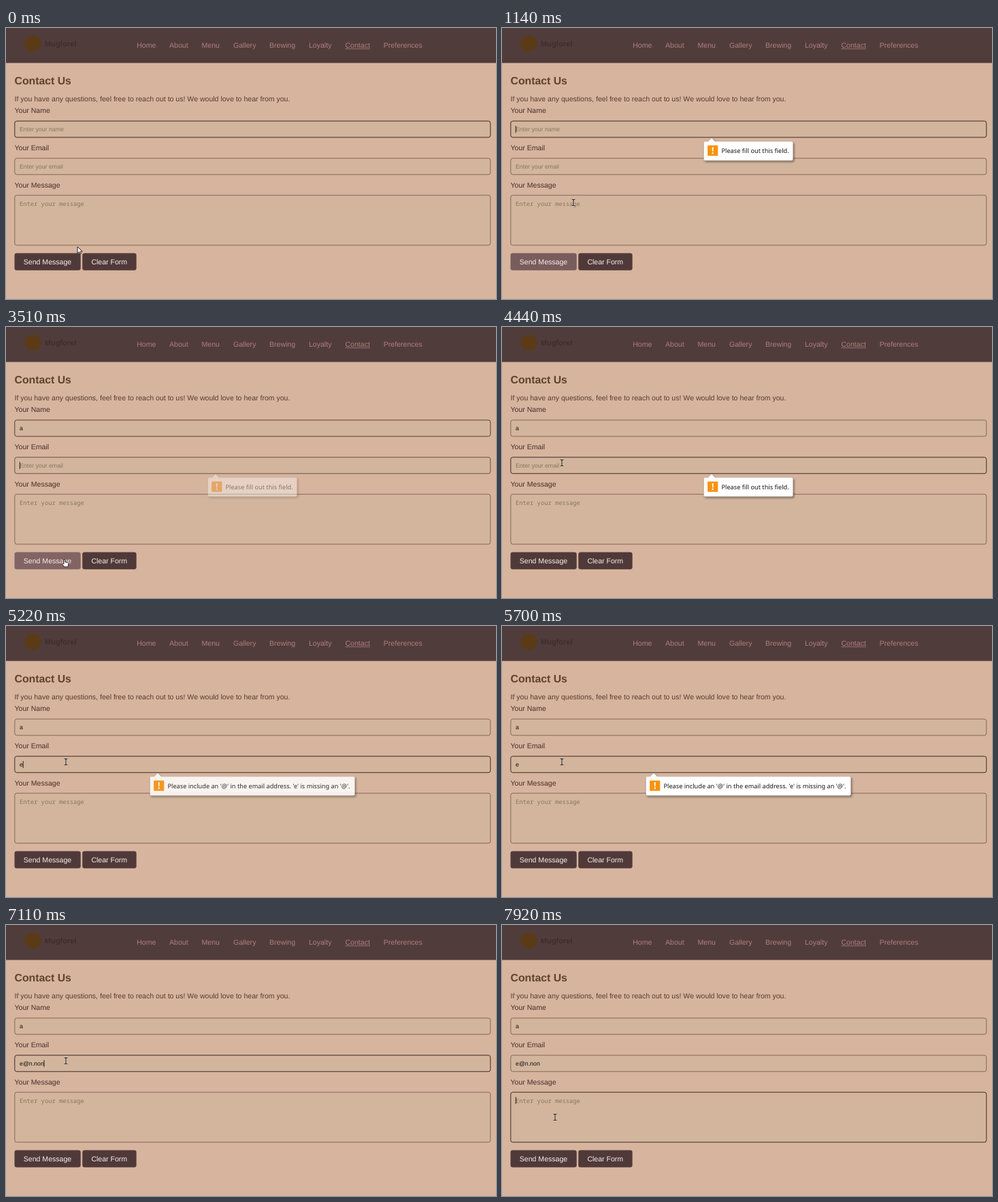
An HTML page for the animation above (8 s loop, 720 by 399 pixels).

```html
<!DOCTYPE html>
<html lang="en">
<head>
<meta charset="utf-8">
<title>Contact form</title>
<style>
html, body { margin: 0; width: 100%; height: 100%; overflow: hidden; background: #d7b49e; }
svg { display: block; width: 100vw; height: 100vh; text-rendering: geometricPrecision; }
text { font: 10.55px "Liberation Sans", Arial, sans-serif; fill: #46302b; white-space: pre; }
.nav { fill: #ae807c; }
.brand { font-size: 11px; font-weight: bold; fill: #402d2c; }
.title { font-size: 15.8px; font-weight: bold; fill: #5f422a; }
.intro { fill: #573c30; }
.value { font-size: 8.79px; fill: #15100e; }
.hint { font-size: 8.79px; fill: #8b7463; }
.mono { font-family: "Noto Sans Mono", "DejaVu Sans Mono", monospace; }
.button { fill: #f6eeec; }
.tip { font: 9.2px "Noto Sans", "Open Sans", sans-serif; fill: #161616; }
</style>
</head>
<body>
<svg id="stage" viewBox="0 0 720 399" preserveAspectRatio="none">
  <defs>
    <filter id="shadow" x="-10%" y="-30%" width="120%" height="180%">
      <feDropShadow dx="1.5" dy="2" stdDeviation="1.4" flood-color="#000" flood-opacity=".45"/>
    </filter>
  </defs>
  <rect width="720" height="399" fill="#d7b49e"/>
  <rect width="720" height="51.5" fill="#513c3c"/>
  <circle cx="39.3" cy="23" r="12" fill="#5b3b15"/>
  <text class="brand" x="57" y="27.3">Mugforel</text>
  <g id="nav"></g>
  <path d="M498.5 30.7H535" stroke="#ae807c" stroke-width=".8"/>
  <text class="title" x="12.5" y="82.6">Contact Us</text>
  <text class="intro" x="12.5" y="108.4">If you have any questions, feel free to reach out to us! We would love to hear from you.</text>
  <g id="form"></g>
  <g id="tips"></g>
  <g id="cursors" stroke-linejoin="round">
    <path d="M0 0V9.6L2.5 7.5 4 10.8 5.6 10 4.2 7H7.2Z" fill="#fff" stroke="#2b2020" stroke-width="1"/>
    <g fill="none">
      <path d="M-2.3-4.6Q0-4.6 0-3.4Q0-4.6 2.3-4.6M0-3.6V3.6M-2.3 4.6Q0 4.6 0 3.4Q0 4.6 2.3 4.6" stroke="#e9dccf" stroke-width="2.2"/>
      <path d="M-2.3-4.6Q0-4.6 0-3.4Q0-4.6 2.3-4.6M0-3.6V3.6M-2.3 4.6Q0 4.6 0 3.4Q0 4.6 2.3 4.6" stroke="#241a18" stroke-width="1.1"/>
    </g>
    <path d="M-1 6V.8Q0-.6 1 .8V4L5.2 5Q6 5.4 5.8 7L5 11H-.4L-3.4 7.2Q-3 5.4-1 7Z" fill="#fff" stroke="#2b2020" stroke-width=".9"/>
  </g>
</svg>
<script>
const LOOP = 8000;
const el = id => document.getElementById(id);
const clamp = v => Math.max(0, Math.min(1, v));
const ramp = (t, start, length) => clamp((t - start) / length);
const smooth = v => v * v * (3 - 2 * v);
const mix = (a, b, k) => `rgb(${a.map((v, i) => Math.round(v + (b[i] - v) * k))})`;
const pulse = (t, [on, off], length) => ramp(t, on, length) - ramp(t, off, length);
const latest = (list, t) => list.filter(item => item[0] <= t).pop();

const links = [['Home', 192.2], ['About', 240], ['Menu', 287.5], ['Gallery', 334], ['Brewing', 387],
  ['Loyalty', 445], ['Contact', 498.5], ['Preferences', 554.8]];

// Each entry in "typed" is the time from which the field holds that text.
const fields = [
  { label: 'Your Name', hint: 'Enter your name', y: 137, h: 24, focus: [-999, 3460],
    typed: [[0, ''], [2000, 'a']] },
  { label: 'Your Email', hint: 'Enter your email', y: 191.8, h: 24, focus: [3460, 7710],
    typed: [[0, ''], [4680, 'e'], [5760, 'e@'], [6270, 'e@n'], [6400, 'e@n.'],
      [6500, 'e@n.n'], [6640, 'e@n.no'], [6860, 'e@n.non']] },
  { label: 'Your Message', hint: 'Enter your message', y: 246.2, h: 73.6, focus: [7710, 9999],
    typed: [[0, '']], mono: true }
];

const tips = [
  { text: 'Please fill out this field.', y: 167, w: 131, show: [660, 1740] },
  { text: 'Please fill out this field.', y: 221.6, w: 131, show: [3460, 4690] },
  { text: "Please include an '@' in the email address. 'e' is missing an '@'.", y: 221.6, w: 301, show: [5110, 5770] },
  { text: "Please enter a part following '@'. 'e@' is incomplete.", y: 221.6, w: 257, show: [5950, 6310] }
];

const path = [[0, 105, 322], [60, 105, 322], [270, 101, 342], [900, 101, 342], [1120, 105, 257],
  [1500, 105, 257], [1950, 89, 239], [2310, 89, 239], [2490, 86, 342], [3650, 86, 342],
  [3960, 88, 200], [7530, 88, 200], [7710, 78, 283], [LOOP, 78, 283]];
const hovers = [[170, 1060], [2440, 3720]];

// Caret restarts its blink here; the first entry places it in its dark half.
const blinks = [-500, 660, 2000, 3460, 4680, 5110, 5760, 5950, 6270, 6400, 6500, 6640, 6860, 7710];

el('nav').innerHTML = links.map(([name, x]) => `<text class="nav" x="${x}" y="29.1">${name}</text>`).join('');

el('form').innerHTML = fields.map(({ label, hint, y, h, mono }) => `
  <text x="12.5" y="${y - 11.7}">${label}</text>
  <g class="field">
    <rect x="12.8" y="${y}" width="699" height="${h}" rx="3" fill="#d2b59c"/>
    <text class="hint ${mono ? 'mono' : ''}" x="20" y="${y + (mono ? 16 : 15)}">${hint}</text>
    <text class="value" x="20" y="${y + 15}"></text>
    <rect class="caret" y="${y + 7}" width=".9" height="10.2" fill="#15100e"/>
  </g>`).join('') + `
  <rect id="send" x="12.5" y="331.6" width="97.2" height="25.2" rx="3.3"/>
  <text class="button" x="25.8" y="347.6">Send Message</text>
  <rect x="112.2" y="331.6" width="79.4" height="25.2" rx="3.3" fill="#503a39"/>
  <text class="button" x="125.4" y="347.6">Clear Form</text>`;

el('tips').innerHTML = tips.map(({ text, y, w }) => `
  <g transform="translate(${362 - w / 2} ${y})">
    <path filter="url(#shadow)" fill="#fff" stroke="#b9a99d" stroke-width=".5"
      d="M2 0H6.5L11.5-5 16.5 0H${w - 2}Q${w} 0 ${w} 2V26Q${w} 28 ${w - 2} 28H2Q0 28 0 26V2Q0 0 2 0Z"/>
    <rect x="5.6" y="5.8" width="15.2" height="15.4" rx="1" fill="#f8930f"/>
    <path d="M12.1 8.5H14.3L13.9 14.8H12.5ZM12.2 16.2H14.2V18.3H12.2Z" fill="#fff"/>
    <text class="tip" x="26" y="17.3">${text}</text>
  </g>`).join('');

const fieldNodes = [...document.querySelectorAll('.field')].map(g => ({
  box: g.children[0], hint: g.children[1], value: g.children[2], caret: g.children[3]
}));
const tipNodes = [...el('tips').children];
const cursors = [...el('cursors').children];

function cursorAt(t) {
  const next = Math.max(1, path.findIndex(p => p[0] > t));
  const [t0, x0, y0] = path[next - 1], [t1, x1, y1] = path[next];
  const k = smooth(ramp(t, t0, t1 - t0));
  return [x0 + (x1 - x0) * k, y0 + (y1 - y0) * k];
}

function drawField(field, node, t) {
  const text = latest(field.typed, t)[1];
  const focused = t >= field.focus[0] && t < field.focus[1];
  const blinkStart = blinks.filter(b => b <= t).pop();
  const caretOn = blinkStart < 0 ? false : (t - blinkStart) % 1000 < 500;
  node.value.textContent = text;
  node.hint.setAttribute('visibility', text ? 'hidden' : 'visible');
  node.caret.setAttribute('x', 19.8 + (text ? node.value.getComputedTextLength() : 0));
  node.caret.setAttribute('visibility', focused && caretOn ? 'visible' : 'hidden');
  node.box.setAttribute('stroke', mix([133, 104, 87], [62, 43, 40], pulse(t, field.focus, 150)));
}

function draw(t) {
  fields.forEach((field, i) => drawField(field, fieldNodes[i], t));
  tips.forEach((tip, i) => tipNodes[i].setAttribute('opacity', pulse(t, tip.show, 130)));

  const hover = hovers.reduce((sum, span) => sum + pulse(t, span, 300), 0);
  el('send').setAttribute('fill', mix([80, 58, 57], [130, 100, 100], smooth(hover)));

  const [x, y] = cursorAt(t);
  const kind = y > 331.6 ? 2 : fields.some(f => y > f.y && y < f.y + f.h) ? 1 : 0;
  el('cursors').setAttribute('transform', `translate(${x} ${y})`);
  cursors.forEach((c, i) => c.setAttribute('visibility', i === kind ? 'visible' : 'hidden'));
}

const start = performance.now();
function tick() {
  draw((performance.now() - start) % LOOP);
  requestAnimationFrame(tick);
}
tick();
</script>
</body>
</html>
```
